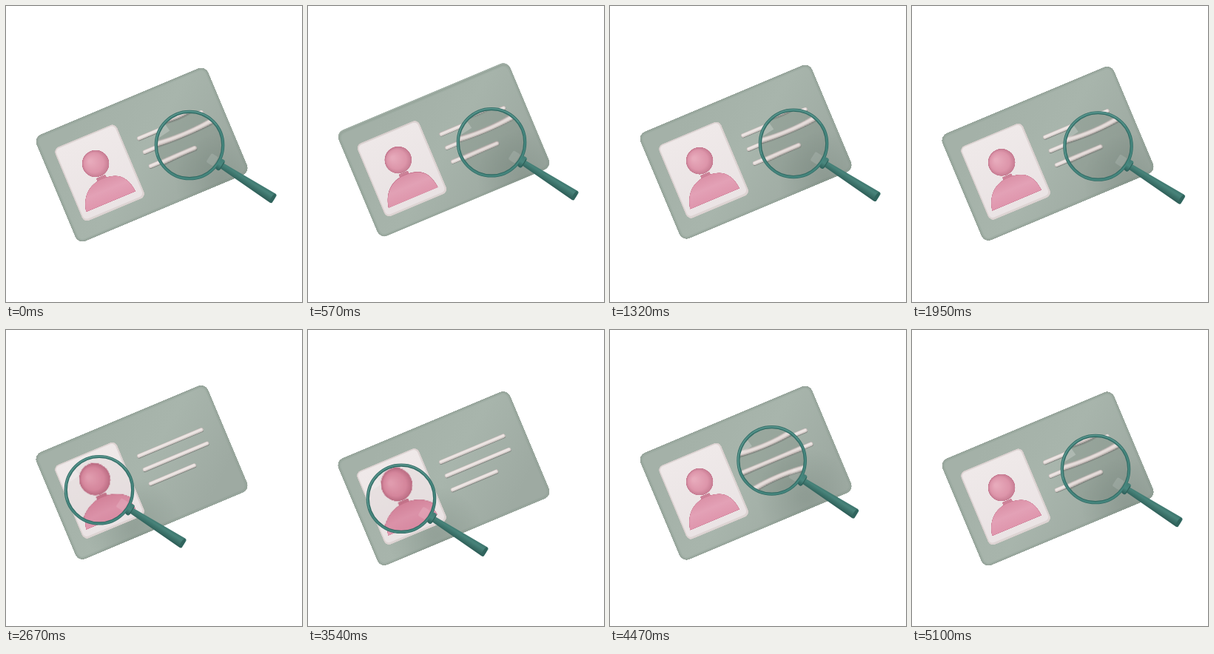
Write an HTML page with a canvas that moves like this. It is 400 by 400 pixels and loops after 5.13 s.

```html
<!DOCTYPE html>
<html lang="en">
<head>
<meta charset="utf-8">
<title>Profile card search</title>
<style>
  html, body { margin: 0; width: 100%; height: 100%; overflow: hidden; background: #fff; }
  canvas { display: block; width: 400px; height: 400px; }
</style>
</head>
<body>
<canvas id="stage" width="400" height="400"></canvas>
<script>
const LOOP = 5130, BOB = LOOP / 3;
const TILT = -22.77 * Math.PI / 180;
const HANDLE = 32.5 * Math.PI / 180;
const HALF_W = 125.4, HALF_H = 77.7, DEPTH = 9;
const LENS = 45;

const makeCanvas = size => Object.assign(document.createElement('canvas'), { width: size, height: size });
const stage = document.getElementById('stage').getContext('2d');
const card = makeCanvas(400).getContext('2d', { willReadFrequently: true });
const glass = makeCanvas(LENS * 2).getContext('2d');

// time, x, y of the lens centre, without the bob
const path = [
  [0, 248, 188], [1710, 248, 188], [2140, 254, 192], [2500, 126, 220], [2670, 126, 221],
  [3540, 126, 228], [3800, 218.6, 180.6], [4470, 218.6, 180.8], [4840, 248, 188], [LOOP, 248, 188]
];

const clamp = v => Math.min(1, Math.max(0, v));
const bob = (t, height) => -height / 2 * (1 - Math.cos(2 * Math.PI * t / BOB));

function lensAt(t) {
  const i = path.findIndex(k => k[0] > t);
  const [t0, x0, y0] = path[i - 1], [t1, x1, y1] = path[i];
  const p = (t - t0) / (t1 - t0), e = p * p * (3 - 2 * p);
  return [x0 + (x1 - x0) * e, y0 + (y1 - y0) * e + bob(t, 5)];
}

// one full turn with a small wind-up and overshoot
function spinAt(t) {
  const p = clamp((t - 450) / 773);
  const half = x => x * x * (2.2 * x - 1.2) / 2;
  return 2 * Math.PI * (p < 0.5 ? half(2 * p) : 1 - half(2 - 2 * p));
}

const tone = (rgb, k) => `rgb(${rgb.map(v => Math.round(Math.min(255, v * k)))})`;

function gradient(ctx, [x0, y0, x1, y1], ...colors) {
  const g = ctx.createLinearGradient(x0, y0, x1, y1);
  colors.forEach((c, i) => g.addColorStop(i / (colors.length - 1), c));
  return g;
}

function roundBox(ctx, x, y, w, h, r) {
  ctx.beginPath();
  ctx.roundRect(x, y, w, h, r);
}

function bodyPath() {
  card.beginPath();
  card.moveTo(-99, 42);
  card.bezierCurveTo(-95, 22, -82, 9.5, -62, 9.5);
  card.bezierCurveTo(-39, 9.5, -29, 20, -27, 42);
  card.closePath();
}

function headPath() {
  card.beginPath();
  card.arc(-62.2, -13.1, 18, 0, 7);
}

function drawPhoto(raise, k, pinkTone) {
  const base = DEPTH / 2, top = base + 5;
  const pink = tone.bind(null);
  const side = pink([196, 112, 138], pinkTone);

  raise(() => roundBox(card, -107, -53, 90, 107, 7), base, top, tone([212, 203, 201], k), tone([221, 212, 211], k));
  roundBox(card, -105.6, -51.6, 86.6, 103, 5.5);
  card.fillStyle = gradient(card, [-60, -52, -60, 53], tone([239, 233, 233], k), tone([234, 227, 228], k));
  card.fill();

  raise(() => roundBox(card, -69, 6, 13, 6, 1), top, top + 2, side, pink([205, 130, 152], pinkTone));

  raise(bodyPath, top, top + 4, side, gradient(card, [-63, 9, -63, 42],
    pink([219, 145, 167], pinkTone), pink([227, 161, 182], pinkTone), pink([223, 150, 173], pinkTone)));

  const ball = card.createRadialGradient(-68, -19, 2, -62.2, -13.1, 18);
  ball.addColorStop(0, pink([231, 170, 187], pinkTone));
  ball.addColorStop(0.7, pink([221, 149, 170], pinkTone));
  ball.addColorStop(1, pink([199, 125, 147], pinkTone));
  raise(headPath, top, top + 4, side, ball);
}

function drawCard(t, lensX, lensY) {
  const a = spinAt(t), c = Math.cos(a), s = Math.sin(a);
  const facesDown = s * c < 0, flat = Math.abs(c), front = c >= 0;
  const faceTone = facesDown ? 0.56 + 0.44 * flat : 0.92 + 0.08 * flat;
  const sideTone = 0.94 - 0.5 * s * c;
  const grey = [166, 179, 170];

  const place = z => {
    card.setTransform(1, 0, 0, 1, 183.5, 201 + bob(t, 9));
    card.rotate(TILT);
    card.translate(0, -z * s);
    card.scale(1, c);
  };
  // stacks copies of a shape from one depth to another
  const raise = (shape, from, to, side, face) => {
    const steps = Math.ceil(Math.abs(to - from) * 1.5);
    for (let i = 0; i <= steps; i++) {
      place(from + (to - from) * i / steps);
      shape();
      card.fillStyle = i === steps ? face : side;
      card.fill();
    }
  };
  const slab = inset => roundBox(card, inset - HALF_W, inset - HALF_H,
    2 * (HALF_W - inset), 2 * (HALF_H - inset), 10 - inset);

  card.setTransform(1, 0, 0, 1, 0, 0);
  card.clearRect(0, 0, 400, 400);

  const near = DEPTH / 2 * (front ? 1 : -1);
  raise(() => slab(0), -near, near, tone([160, 173, 164], sideTone), tone([152, 166, 156], faceTone));
  slab(1.6);
  card.fillStyle = gradient(card, [-60, -HALF_H, 60, HALF_H],
    tone(grey, faceTone * 0.99), tone(grey, faceTone * 1.01), tone(grey, faceTone * 0.95));
  card.fill();
  slab(2.4);
  card.lineWidth = 1.8;
  card.strokeStyle = 'rgba(60,80,70,.06)';
  card.stroke();
  if (!front) return;

  // soft shade under the magnifier
  card.setTransform(1, 0, 0, 1, lensX + 45, lensY + 48);
  card.globalCompositeOperation = 'source-atop';
  const shade = card.createRadialGradient(0, 0, 5, 0, 0, 65);
  shade.addColorStop(0, `rgba(50,70,60,${0.15 * flat})`);
  shade.addColorStop(1, 'rgba(50,70,60,0)');
  card.fillStyle = shade;
  card.fillRect(-65, -65, 130, 130);
  card.globalCompositeOperation = 'source-over';

  const k = facesDown ? 0.82 + 0.18 * flat : 1;
  drawPhoto(raise, k, facesDown ? 0.76 + 0.24 * flat : 1);
  for (const [v, end] of [[-22, 96.5], [-2, 96.5], [18.7, 69]]) {
    const bar = (dy, w) => roundBox(card, 5 - w / 2, v + dy - w / 2, end - 5 + w, w, w / 2);
    const base = DEPTH / 2;
    place(base);
    bar(1.2, 5);
    card.fillStyle = tone([132, 139, 133], faceTone);
    card.fill();
    raise(() => bar(0, 4.8), base, base + 3, tone([190, 178, 177], k), tone([212, 204, 201], k));
    bar(-0.4, 3);
    card.fillStyle = tone([236, 229, 227], k);
    card.fill();
  }
}

// radial magnification, growing towards the rim; dark tones deepen most
function refract(cx, cy) {
  const size = LENS * 2, x0 = Math.round(cx) - LENS, y0 = Math.round(cy) - LENS;
  const src = card.getImageData(x0, y0, size, size).data;
  const out = glass.createImageData(size, size), dst = out.data;
  const ox = cx - x0, oy = cy - y0;
  const deepen = v => v * (0.76 + 0.23 * v / 255);
  for (let y = 0; y < size; y++) for (let x = 0; x < size; x++) {
    const dx = x + 0.5 - ox, dy = y + 0.5 - oy, q = (dx * dx + dy * dy) / (LENS * LENS);
    if (q > 1.05) continue;
    const m = 0.92 - 0.13 * q;
    const sx = ox + dx * m - 0.5, sy = oy + dy * m - 0.5;
    const ix = Math.floor(sx), iy = Math.floor(sy), fx = sx - ix, fy = sy - iy;
    let r = 0, g = 0, b = 0, alpha = 0;
    for (let j = 0; j < 2; j++) for (let i = 0; i < 2; i++) {
      const n = ((iy + j) * size + ix + i) * 4;
      const w = (i ? fx : 1 - fx) * (j ? fy : 1 - fy) * src[n + 3];
      r += w * src[n]; g += w * src[n + 1]; b += w * src[n + 2]; alpha += w;
    }
    if (!alpha) continue;
    dst.set([deepen(r / alpha), deepen(g / alpha), deepen(b / alpha), alpha], (y * size + x) * 4);
  }
  glass.putImageData(out, 0, 0);
  stage.drawImage(glass.canvas, x0, y0);
}

function ring(radius, width, color, from = 0, to = 2 * Math.PI) {
  stage.beginPath();
  stage.arc(0, 0, radius, from, to);
  stage.lineWidth = width;
  stage.strokeStyle = color;
  stage.stroke();
}

function drawLens(cx, cy) {
  stage.save();
  stage.beginPath();
  stage.arc(cx, cy, LENS, 0, 7);
  stage.clip();
  stage.fillStyle = '#fff';
  stage.fillRect(cx - 50, cy - 50, 100, 100);
  refract(cx, cy);

  stage.translate(cx, cy);
  stage.rotate(HANDLE);
  stage.fillStyle = 'rgba(255,255,255,.13)';
  roundBox(stage, 31, -7, 11, 14, 2);
  stage.fill();
  stage.beginPath();
  stage.arc(0, 0, 43, 2.8, 3.28);
  stage.lineTo(-33, -2);
  stage.closePath();
  stage.fillStyle = 'rgba(255,255,255,.22)';
  stage.fill();
  stage.restore();

  stage.save();
  stage.translate(cx, cy);
  ring(45.2, 4.2, '#326b64');
  ring(45.4, 2.4, '#45857d');
  ring(45.8, 0.9, 'rgba(130,178,170,.5)', Math.PI * 0.9, Math.PI * 1.8);

  stage.rotate(HANDLE);
  stage.beginPath();
  stage.moveTo(50, -4);
  stage.lineTo(133, -7.2);
  stage.quadraticCurveTo(136, -7, 136, -5);
  stage.lineTo(136, 5);
  stage.quadraticCurveTo(136, 7, 133, 7.2);
  stage.lineTo(50, 4);
  stage.closePath();
  stage.fillStyle = gradient(stage, [0, -7, 0, 7], '#3d766e', '#48837a', '#3a7068', '#2c5b55');
  stage.fill();
  stage.beginPath();
  stage.ellipse(133.5, 0, 2.2, 6.8, 0, 0, 7);
  stage.fillStyle = '#30645d';
  stage.fill();
  roundBox(stage, 46, -8.2, 6.5, 16.4, 2.6);
  stage.fillStyle = gradient(stage, [0, -8, 0, 8], '#437e76', '#4a877e', '#2d605a');
  stage.fill();
  stage.fillStyle = '#2c5c56';
  stage.fillRect(51.5, -6, 1, 12);
  stage.restore();
}

function render(t) {
  const [x, y] = lensAt(t);
  stage.fillStyle = '#fff';
  stage.fillRect(0, 0, 400, 400);
  drawCard(t, x, y);
  stage.drawImage(card.canvas, 0, 0);
  drawLens(x, y);
}

const start = performance.now();
function tick() {
  render((performance.now() - start) % LOOP);
  requestAnimationFrame(tick);
}
tick();
</script>
</body>
</html>
```
